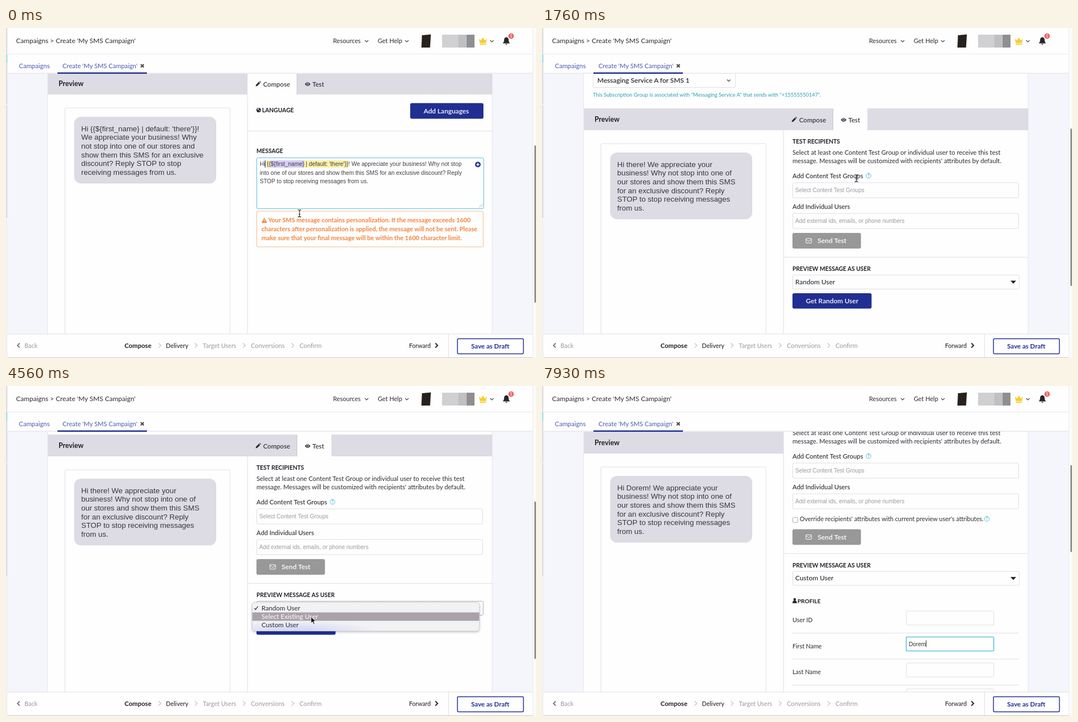
Animation of 948 by 591 pixels, one loop 8 s. Source, as an HTML page:

```html
<!DOCTYPE html>
<html lang="en">
<head>
<meta charset="utf-8">
<title>SMS campaign composer</title>
<style>
  html, body { margin: 0; width: 100%; height: 100%; overflow: hidden; background: #fefefe; }
  svg { display: block; width: 948px; height: 591px; }
  text { font-family: Lato, sans-serif; white-space: pre; }
  text.plain { font-family: "Liberation Sans", Arial, sans-serif; }
</style>
</head>
<body>
<svg id="stage" viewBox="0 0 948 591" xmlns="http://www.w3.org/2000/svg"></svg>
<script>
const LOOP = 8000;
const NAVY = '#212f92', INK = '#2b2b33', GREY = '#9a9aa2', PANEL = '#dddce4',
      LINE = '#dfdfe4', CYAN = '#5cc2de', WHITE = '#fefefe', ORANGE = '#f5843c';
const NAME = 'Dorem';
const stage = document.getElementById('stage');
const $ = id => document.getElementById(id);

// ---- Markup helpers; text is placed by the middle of its capitals ----
const text = (x, y, size, str, fill = INK, weight = 400, extra = '') =>
  `<text x="${x}" y="${y + size * 0.35}" font-size="${size}" fill="${fill}" font-weight="${weight}" ${extra}>${str}</text>`;
const plain = (x, y, size, str, fill = '#3f3f46', extra = '') =>
  text(x, y, size, str, fill, 400, 'class="plain" ' + extra);
const rect = (x, y, w, h, fill, extra = '') =>
  `<rect x="${x}" y="${y}" width="${w}" height="${h}" fill="${fill}" ${extra}/>`;
const frame = (x, y, w, h, stroke = LINE, extra = '') =>
  rect(x + 0.5, y + 0.5, w - 1, h - 1, WHITE, `stroke="${stroke}" rx="2" ${extra}`);
const stroke = (d, color, width = 1, extra = '') =>
  `<path d="${d}" fill="none" stroke="${color}" stroke-width="${width}" ${extra}/>`;
const shape = (d, fill, extra = '') => `<path d="${d}" fill="${fill}" ${extra}/>`;
const circle = (x, y, r, fill, extra = '') => `<circle cx="${x}" cy="${y}" r="${r}" fill="${fill}" ${extra}/>`;
const group = (id, body, extra = '') => `<g id="${id}" ${extra}>${body}</g>`;
const hLine = (x1, x2, y, color = LINE) => stroke(`M${x1} ${y}H${x2}`, color);
const button = (x, y, w, h, fill) => rect(x, y, w, h, fill, 'rx="3"');
const chevronDown = (x, y) => stroke(`M${x - 3} ${y - 1.5}l3 3l3 -3`, '#444', 1.2);
const chevronRight = (x, y, color, r = 3, w = 1.2) => stroke(`M${x - r / 2} ${y - r}l${r} ${r}l${-r} ${r}`, color, w);
const help = (x, y) => circle(x, y, 4.4, 'none', `stroke="${CYAN}"`) +
  text(x, y, 7, '?', '#2fa9c8', 700, 'text-anchor="middle"');

// ---- Fixed page chrome ----
const header = () =>
  rect(0, 0, 948, 81, WHITE) + hLine(3, 942, 46.5, '#e9e9ee') + hLine(3, 942, 81, LINE) +
  text(18, 23, 12.05, "Campaigns &gt; Create 'My SMS Campaign'") +
  text(585, 23.5, 11.1, 'Resources') + chevronDown(645, 23.5) +
  text(665, 23.5, 11.1, 'Get Help') + chevronDown(717, 23.5) + chevronDown(869, 23.5) +
  shape('M744 13L760 11.500L758.500 35H743Z', '#26211d') +
  rect(780, 12, 29, 23, '#d0d0d2') + rect(809, 12, 15, 23, '#c0c0c2') + rect(824, 12, 14, 23, '#8f8f91') +
  shape('M846 19l3.500 3.500l3.500 -5.500l3.500 5.500l3.500 -3.500l-1.500 8h-11zM847.500 28h11v2h-11z', '#f7cf2c') +
  shape('M888.500 27.500q2.500 -2 2.500 -6q0 -4.500 4 -5q4 .5 4 5q0 4 2.500 6zM893 28.500h4q-2 3 -4 0z', '#26262b') +
  circle(903.5, 14.5, 5, '#ed6a6f') + text(903.5, 14.5, 7, '1', '#fff', 400, 'text-anchor="middle"') +
  text(23, 68, 11.5, 'Campaigns', '#4c58b5') +
  text(101, 68, 11.3, "Create 'My SMS Campaign'", '#4c58b5') +
  stroke('M241 65l5.500 5.500m0 -5.500l-5.500 5.500', '#444', 2) + rect(92, 79.5, 160, 2.5, NAVY);

const footer = () =>
  rect(0, 548, 948, 43, WHITE) + hLine(3, 942, 548) + stroke('M791.500 548V590', LINE) +
  chevronRight(22.500, 568.500, '#777', -4, 1.8) + text(33, 569, 11, 'Back', GREY) +
  text(212, 568.500, 11.5, 'Compose', '#1f1f26', 700) + text(286, 569, 10.9, 'Delivery', INK, 500) +
  text(352, 569, 11, 'Target Users', GREY) + text(438, 569, 11.2, 'Conversions', GREY) +
  text(525, 569, 11.2, 'Confirm', GREY) +
  [275, 340, 426, 513].map(x => chevronRight(x, 568.5, '#c4c4ca', 4)).join('') +
  text(721, 569, 10.6, 'Forward', INK, 500) + chevronRight(770, 568.500, INK, 4, 2) +
  frame(807, 556, 119, 28, NAVY, 'stroke-width="1.5"') + text(832, 570, 11.7, 'Save as Draft', NAVY, 700) +
  hLine(0, 948, 590.5, '#c9c6c9');

const edges = () =>
  rect(0, 0, 2.5, 340, '#dedde6') + rect(0, 340, 2.5, 251, '#f0f0f4') + rect(0, 47, 2.5, 15, '#9fe6f1') +
  hLine(0, 2.5, 137.5, WHITE) +
  rect(942, 0, 6, 591, '#fbfbfb') + stroke('M942.500 0V591', '#ececef') +
  rect(945, 0, 3, 10, '#929294', 'id="thumb" rx="1.5"');

// ---- Scrolling content, measured from the top of the panel's tab row ----
const tabRow = () =>
  rect(75, 0, 795, 39, PANEL) +
  rect(432, 0, 88.5, 39, WHITE, 'id="composeTab"') + rect(521, 0, 61, 39, WHITE, 'id="testTab"') +
  stroke('M520.500 0V39', '#c9c8d0') +
  shape('M446.500 24.500l.8 -3l5 -5l2.200 2.200l-5 5zM453 15.800l.9 -.9l2.200 2.200l-.9 .9z', INK) +
  text(460, 20.5, 11.6, 'Compose', INK, 500) +
  shape('M534.500 20.500q5 -7 10 0q-5 7 -10 0z', INK) + circle(539.5, 20.3, 2.4, PANEL) + circle(539.5, 20.3, 1.3, INK) +
  text(548, 20.5, 11.6, 'Test', INK, 500);

const aboveTabs = () =>
  frame(91, -63, 255.5, 26) + text(99, -50, 12.1, 'Messaging Service A for SMS 1', INK, 600) + chevronDown(334, -50) +
  text(91, -24, 9.4, 'This Subscription Group is associated with "Messaging Service A" that sends with "+15555550147".', '#2a9db3');

const warning = [
  [469, 'Your SMS message contains personalization. If the message exceeds 1600'],
  [457, 'characters after personalization is applied, the message will not be sent. Please'],
  [457, 'make sure that your final message will be within the 1600 character limit.']];

const composePane = () =>
  circle(452, 67, 4, INK) + shape('M450 64.500l2.500 -1l-.5 2.500l-2 1zM453 67l2 0l-1.500 2.500z', WHITE) +
  text(458, 67, 10.5, 'LANGUAGE', '#1f1f26', 700) +
  button(723, 54.5, 131, 28, NAVY) + text(747, 68.5, 12.1, 'Add Languages', '#fff', 600) +
  hLine(432, 870, 104.5) + text(448, 140, 10.4, 'MESSAGE', '#1f1f26', 700) +
  frame(448, 152, 407, 92, CYAN) + stroke('M846 241.500l7 -7m-3 7l3 -3', '#999', 0.8) +
  rect(466, 157, 146.5, 13, '#fcf0a4') + rect(473, 157, 61, 13, '#d6cdf3') +
  ["Hi {{${first_name} | default: 'there'}}! We appreciate your business! Why not stop",
   'into one of our stores and show them this SMS for an exclusive discount? Reply',
   'STOP to stop receiving messages from us.'].map((s, i) => plain(454, 163.5 + i * 15.6, 10.23, s)).join('') +
  rect(463, 157, 1, 13, '#222', 'id="messageCaret"') +
  circle(844, 164.5, 5, NAVY) + stroke('M841 164.500h6m-3 -3v6', '#fff', 1.5) +
  frame(448, 247.5, 406, 65, '#f9b98d') +
  shape('M457 269l5 -9.500l5 9.500z', ORANGE) + stroke('M462 262.500v3m0 1v1.200', WHITE, 1.2) +
  warning.map(([x, s], i) => text(x, 264.5 + i * 15.8, 11.1, s, ORANGE, 700)).join('');

const testPane = () =>
  text(448, 59, 10.5, 'TEST RECIPIENTS', '#1f1f26', 700) +
  text(448, 79, 11.3, 'Select at least one Content Test Group or individual user to receive this test') +
  text(448, 94.5, 11.3, "message. Messages will be customized with recipients' attributes by default.") +
  text(448, 121, 11.4, 'Add Content Test Groups', INK, 500) + help(584, 120.5) +
  frame(448, 132.5, 405, 28) + plain(453, 146, 10.15, 'Select Content Test Groups', GREY) +
  text(448, 176, 11.4, 'Add Individual Users', INK, 500) +
  frame(448, 187.5, 405, 28) + plain(453, 201, 10.15, 'Add external ids, emails, or phone numbers', GREY) +
  group('override',
    rect(448.500, 230.500, 9, 9, WHITE, 'rx="2" stroke="#aaa"') +
    text(461, 233.500, 11, "Override recipients' attributes with current preview user's attributes.") + help(795.5, 233)) +
  group('lower',
    button(448, 223, 122.5, 28, '#989898') + rect(472, 233, 10, 8, 'none', 'stroke="#fff" rx="1"') +
    stroke('M472 234.500l5 3.500l5 -3.500', '#fff') + text(493, 237, 12.2, 'Send Test', '#fff', 600) +
    hLine(432, 870, 266.5) + text(448, 287.5, 10.4, 'PREVIEW MESSAGE AS USER', '#1f1f26', 700) +
    rect(448.500, 298.500, 405, 25, WHITE, 'id="select" rx="2"') +
    text(453, 310.5, 12, 'Random User', INK, 500, 'id="selectText"') + shape('M838 308.500h10l-5 5.500z', '#222') +
    group('randomButton', button(448, 331, 141.5, 27.5, NAVY) + text(472, 344.5, 12, 'Get Random User', '#fff', 600)));

const profile = () =>
  circle(452, 377, 2.3, INK) + shape('M448 384q0 -5 4 -5q4 0 4 5z', INK) +
  text(457, 380, 10.3, 'PROFILE', '#1f1f26', 700) +
  ['User ID', 'First Name', 'Last Name', ''].map((label, i) => {
    const y = 397.5 + i * 46.5;
    return frame(651, y, 157.5, 26, LINE, `id="field${i}"`) + text(448, y + 17, 10.9, label) + hLine(448, 853, y + 40);
  }).join('') +
  plain(656, 457, 10.2, '', '#333', 'id="typed"') + rect(0, 450.500, 1, 12, '#222', 'id="nameCaret"');

const composedLines = ["Hi {{${first_name} | default: 'there'}}!", 'We appreciate your business! Why',
  'not stop into one of our stores and', 'show them this SMS for an exclusive', 'discount? Reply STOP to stop', 'receiving messages from us.'];
const personalLines = name => [`Hi ${name}! We appreciate your`, 'business! Why not stop into one of',
  'our stores and show them this SMS', 'for an exclusive discount? Reply', 'STOP to stop receiving messages', 'from us.'];

const previewPane = () =>
  rect(75, 0, 357, 39, PANEL) + text(94, 19.5, 12.4, 'Preview', '#1f1f26', 700) +
  frame(105, 62.500, 296, 600) + rect(122, 79, 254, 119.5, PANEL, 'rx="12"') +
  [0, 1, 2, 3, 4, 5].map(i => plain(134.5, 100 + i * 15.7, 13.4, '', '#36363c', `id="line${i}"`)).join('');

const dropdown = () =>
  rect(440, 389, 407, 52, '#000', 'rx="5" opacity=".22" filter="url(#soft)"') +
  rect(440, 387.5, 407, 51.5, '#f2f1f3', 'rx="5" stroke="#b9b8bd" stroke-width=".6"') +
  rect(440, 387.5, 407, 51.5, 'url(#tint)', 'rx="5"') +
  rect(440.5, 0, 406, 15, '#a8a3a9', 'id="highlight"') +
  stroke('M444.500 398l2 2.500l4 -6', INK, 1.3, 'id="tick"') +
  ['Random User', 'Select Existing User', 'Custom User']
    .map((s, i) => text(457, 398 + i * 15, 11.7, s, INK, 400, `id="option${i}"`)).join('');

stage.innerHTML =
  `<defs><clipPath id="view"><rect x="0" y="82" width="942" height="466"/></clipPath>
   <filter id="soft" x="-5%" y="-30%" width="110%" height="170%"><feGaussianBlur stdDeviation="2"/></filter>
   <radialGradient id="tint" cx=".2" cy="1" r=".35"><stop offset="0" stop-color="#cfd2f8"/><stop offset="1" stop-color="#cfd2f8" stop-opacity="0"/></radialGradient></defs>` +
  rect(0, 0, 948, 591, '#f5f5fc') +
  `<g clip-path="url(#view)">` +
    rect(75, 81, 795, 467, WHITE) + stroke('M74.500 81V548M869.500 81V548', '#e6e6ec') +
    group('panel', stroke('M432 39V800', LINE) + aboveTabs() + tabRow() +
      group('compose', composePane()) + group('test', testPane() + group('profile', profile()))) +
    group('preview', previewPane()) + '</g>' +
  header() + footer() + edges() + group('dropdown', dropdown()) +
  group('arrow', shape('M0 0V11.500L2.700 9L4.700 13.300L6.600 12.400L4.700 8.300H8.300Z', '#111', 'stroke="#fff" stroke-width=".8"')) +
  group('beam', stroke('M-3 -6.500q3 0 3 2V4.500q0 2 -3 2M3 -6.500q-3 0 -3 2M3 6.500q-3 0 -3 -2M-1.500 1.500h3', '#222', 1.1));

// ---- Motion ----
const smooth = x => x * x * (3 - 2 * x);
function track(keys, t, ease = x => x) {
  if (t <= keys[0][0]) return keys[0].slice(1);
  for (let i = 1; i < keys.length; i++) {
    const [a, b] = [keys[i - 1], keys[i]];
    if (t < b[0]) {
      const k = ease((t - a[0]) / (b[0] - a[0]));
      return a.slice(1).map((v, j) => v + (b[j + 1] - v) * k);
    }
  }
  return keys[keys.length - 1].slice(1);
}
const scrollKeys = [[500, 80], [640, 160], [780, 220], [880, 220], [980, 165], [1080, 144],
  [2130, 144], [2300, 107], [2400, 93], [2500, 87], [5730, 87], [5900, 31], [5990, 12], [6080, 5]];
const cursorKeys = [[20, 525, 332], [130, 550, 360], [1100, 550, 360], [1320, 556, 163], [1480, 556, 163],
  [1830, 563, 281], [3020, 563, 281], [3220, 557, 391], [4360, 557, 391], [4700, 539, 426],
  [5900, 539, 426], [6230, 712, 467]];
const keyTimes = [6800, 6930, 7080, 7250, 7430];
const within = (t, a, b) => t >= a && t < b;
const show = (id, visible) => $(id).setAttribute('visibility', visible ? 'inherit' : 'hidden');
const move = (id, x, y) => $(id).setAttribute('transform', `translate(${x} ${y})`);
const set = (id, attrs) => Object.entries(attrs).forEach(([k, v]) => $(id).setAttribute(k, v));

function draw(t) {
  const [top] = track(scrollKeys, t);
  const testing = t >= 1430, custom = t >= 5000, listed = t >= 5200, focused = t >= 6700;
  move('panel', 0, top);
  move('preview', 0, Math.max(top, testing ? 82 : 80));
  set('thumb', listed ? { y: 118 + (87 - top) * 0.286, height: 156 } : { y: 180 + (144 - top) * 0.47, height: 282 });

  for (const id of ['compose', 'composeTab']) show(id, !testing);
  for (const id of ['test', 'testTab']) show(id, testing);
  show('messageCaret', !testing && (t < 100 || within(t, 330, 830)));
  const lines = testing ? personalLines(t >= 7660 ? NAME : 'there') : composedLines;
  lines.forEach((s, i) => { $('line' + i).textContent = s; });

  show('override', custom);
  show('randomButton', !custom);
  move('lower', 0, custom ? 28.5 : 0);
  $('selectText').textContent = custom ? 'Custom User' : 'Random User';
  const dotted = t >= 3220 && !focused;
  set('select', { stroke: dotted ? '#777' : LINE, 'stroke-dasharray': dotted ? '1.5 1' : 'none' });

  $('profile').setAttribute('opacity', track([[5200, 0], [5360, 1]], t)[0]);
  set('field1', { stroke: focused ? CYAN : LINE, 'stroke-width': focused ? 1.6 : 1 });
  $('typed').textContent = NAME.slice(0, keyTimes.filter(k => t >= k).length);
  $('nameCaret').setAttribute('x', 656 + $('typed').getComputedTextLength());
  show('nameCaret', testing && focused && !within(t, 7660, 7930));

  const [x, y] = track(cursorKeys, t, smooth);
  const row = Math.max(0, Math.min(2, Math.floor((y - 390.5) / 15)));
  const lit = !within(t, 4800, 4870);
  show('dropdown', within(t, 3220, 5130));
  $('dropdown').setAttribute('opacity', track([[4930, 1], [5130, 0]], t)[0]);
  $('highlight').setAttribute('y', 390.5 + row * 15);
  show('highlight', lit);
  for (let i = 0; i < 3; i++) $('option' + i).setAttribute('fill', lit && i === row ? '#fff' : INK);
  $('tick').setAttribute('stroke', lit && row === 0 ? '#fff' : INK);

  const arrow = within(t, 1220, 1700) || within(t, 3100, 6130);
  show('arrow', arrow);
  show('beam', !arrow && t < 6800);
  move('arrow', x, y);
  move('beam', x, y);
}

function tick() {
  draw(performance.now() % LOOP);
  requestAnimationFrame(tick);
}
tick();
</script>
</body>
</html>
```
